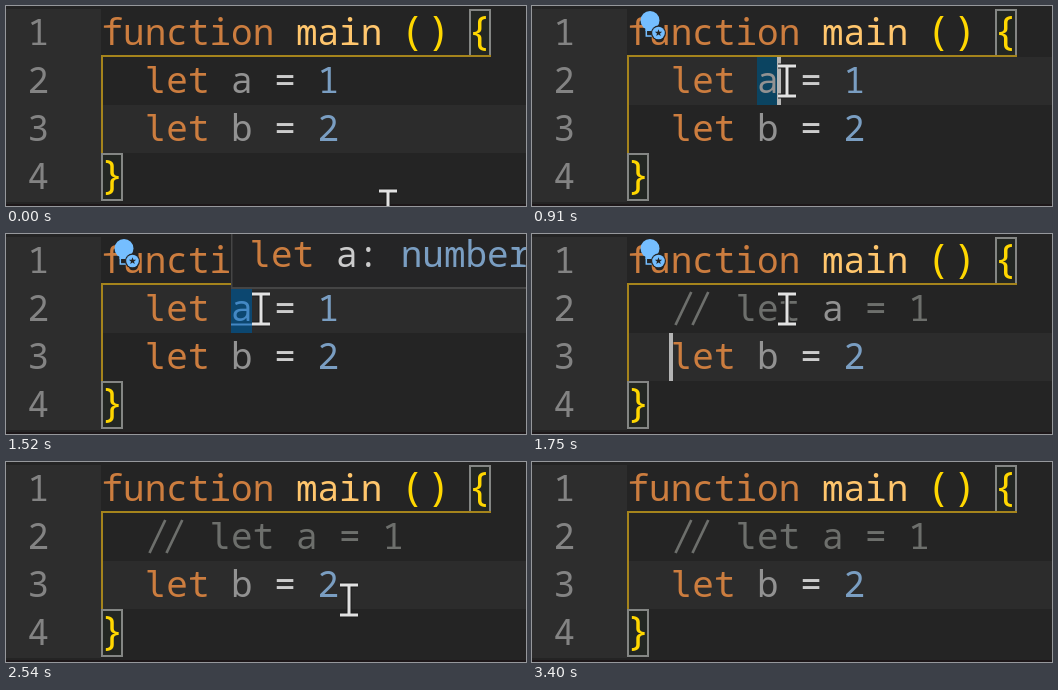
These frames come from a looping animation (520 px wide and 200 px high, 3480 ms). An HTML page with a canvas:

```html
<!DOCTYPE html>
<html lang="en">
<head>
<meta charset="utf-8">
<title>Editor</title>
<style>
html, body { margin: 0; width: 100%; height: 100%; overflow: hidden; background: #242424; }
canvas { display: block; }
</style>
</head>
<body>
<canvas id="stage" width="520" height="200"></canvas>
<script>
const ctx = document.getElementById('stage').getContext('2d');
const LOOP = 3480, LEFT = 95.5, COL = 21.6, ROW = 48, TOP = 3;
const KEY = '#cc7d3f', NAME = '#ffc66d', GOLD = '#ffd700', NUM = '#7a9ec2',
      VAR = '#929292', OP = '#cccccc', NOTE = '#6d6f6c', BLUE = '#75beff';
const FONT = '36px "Noto Sans Mono", monospace',
      BRACKET_FONT = '40px "Noto Sans Mono", monospace',
      TAILED_FONT = '35.5px "DejaVu Sans Mono", monospace';

// Mouse positions: [start ms, x, y]
const PATH = [
  [0, 382, 200], [70, 372, 187], [150, 341, 152], [220, 296, 110], [290, 259, 79],
  [370, 240, 68], [440, 236, 66], [510, 254.5, 75], [590, 255, 75],
  [2390, 264, 83], [2470, 299, 108], [2540, 343, 138], [2620, 384, 166],
  [2700, 414, 188], [2770, 429, 203], [2850, 429, 260]
];

function box(x, y, w, h, color) {
  ctx.fillStyle = color;
  ctx.fillRect(x, y, w, h);
}

function disc(x, y, r, color) {
  ctx.fillStyle = color;
  ctx.beginPath();
  ctx.arc(x, y, r, 0, 7);
  ctx.fill();
}

function line(x1, y1, x2, y2, width, color) {
  ctx.strokeStyle = color;
  ctx.lineWidth = width;
  ctx.beginPath();
  ctx.moveTo(x1, y1);
  ctx.lineTo(x2, y2);
  ctx.stroke();
}

// One glyph per cell: tall brackets, and an l with a curved tail
function text(s, x, y, color) {
  ctx.fillStyle = color;
  ctx.textAlign = 'center';
  [...s].forEach((c, i) => {
    ctx.font = c === 'l' ? TAILED_FONT : /[(){}]/.test(c) ? BRACKET_FONT : FONT;
    ctx.fillText(c, x + (i + .5) * COL, y);
  });
}

function code(s, row, col, color) {
  text(s, LEFT + col * COL, 39 + row * ROW, color);
}

function caret(x, row, alpha = 1) {
  ctx.globalAlpha = alpha;
  box(x, TOP + row * ROW, 4, ROW, '#b4b4b4');
  ctx.globalAlpha = 1;
}

function braceBox(x, y) {
  box(x, y, 22, ROW, 'rgba(0,100,0,.04)');
  ctx.strokeStyle = '#848684';
  ctx.lineWidth = 2;
  ctx.strokeRect(x + 1, y + 1, 20, ROW - 2);
}

function assignment(row, name, value, color = VAR) {
  code('let', row, 2, KEY);
  code(name, row, 6, color);
  code('=', row, 8, OP);
  code(value, row, 10, NUM);
}

function bulb() {
  disc(118, 14.5, 9.5, BLUE);
  box(113.5, 20, 9, 5, BLUE);
  ctx.strokeStyle = BLUE;
  ctx.lineWidth = 1.5;
  ctx.strokeRect(114.3, 24, 7.4, 6);
  disc(126.5, 27, 7.5, '#242424');
  disc(126.5, 27, 6.3, BLUE);
  ctx.fillStyle = '#242424';
  ctx.beginPath();
  for (let i = 0; i < 10; i++) {
    const r = i % 2 ? 1.6 : 3.8, a = (i / 5 - .5) * Math.PI;
    ctx.lineTo(126.5 + r * Math.cos(a), 27 + r * Math.sin(a));
  }
  ctx.fill();
}

function tooltip(alpha) {
  const x = 243.5, y = 33;
  ctx.globalAlpha = alpha;
  box(225, 0, 295, 55, '#454545');
  box(226.5, 0, 294, 53, '#252526');
  text('let', x, y, KEY);
  text('a:', x + 4 * COL, y, OP);
  text('number', x + 7 * COL, y, NUM);
  ctx.globalAlpha = 1;
}

function mouse(x, y) {
  for (const [width, color] of [[5, '#1a1a1a'], [3, '#e2e2e2']]) {
    for (const end of [-15, 15]) line(x - 9, y + end, x + 9, y + end, width, color);
    line(x, y - 15, x, y + 15, width, color);
  }
}

function draw(t) {
  const commented = t >= 1750;
  const activeRow = t >= 680 && !commented ? 1 : 2;
  const selected = t >= 910 && !commented;
  const link = t >= 1520 && !commented;

  box(0, 0, 520, 200, '#242424');
  box(0, TOP, 95, 193, '#2d2d2d');
  box(0, 198, 520, 2, '#1d1719');
  box(96, TOP + activeRow * ROW, 424, ROW, '#2c2c2c');
  if (selected) box(225, 51, 21, ROW, link ? '#0c4770' : '#0b4461');

  braceBox(463, TOP);
  braceBox(95, TOP + 3 * ROW);
  box(95, 49, 390, 2, '#a5841c');
  box(95, 49, 2, 98, '#a5841c');

  for (let i = 0; i < 4; i++) text(`${i + 1}`, 21.5, 39 + i * ROW, '#838383');
  code('function', 0, 0, KEY);
  code('main', 0, 9, NAME);
  code('(', 0, 13.9, GOLD);
  code(')', 0, 15.1, GOLD);
  code('{', 0, 17, GOLD);
  if (commented) {
    for (const x of [143.5, 160.5]) line(x, 91, x + 15.8, 58, 2.7, NOTE);
    code('let', 1, 5, NOTE);
    code('a', 1, 9, t < 1990 ? VAR : NOTE);
    code('= 1', 1, 11, NOTE);
  } else {
    assignment(1, 'a', '1', link ? '#4488c4' : VAR);
    if (link) box(225, 89.5, 21, 2, '#4488c4');
  }
  assignment(2, 'b', '2');
  code('}', 3, 0, GOLD);

  if (t >= 680 && t < 1370) caret(245, 1);
  if (commented && t < 2390) caret(137, 2);
  if (t >= 3000 && t < 3400) caret(137, 2, t < 3080 ? .5 : 1);
  if (t >= 910 && t < 2070) bulb();
  if (t >= 1060 && !commented) tooltip(Math.min(1, Math.floor((t - 1060) / 77.5 + 1) / 5));

  const [, x, y] = PATH.findLast(p => p[0] <= t);
  mouse(x, y);
}

const start = performance.now();
function tick() {
  draw((performance.now() - start) % LOOP);
  requestAnimationFrame(tick);
}
tick();
</script>
</body>
</html>
```
